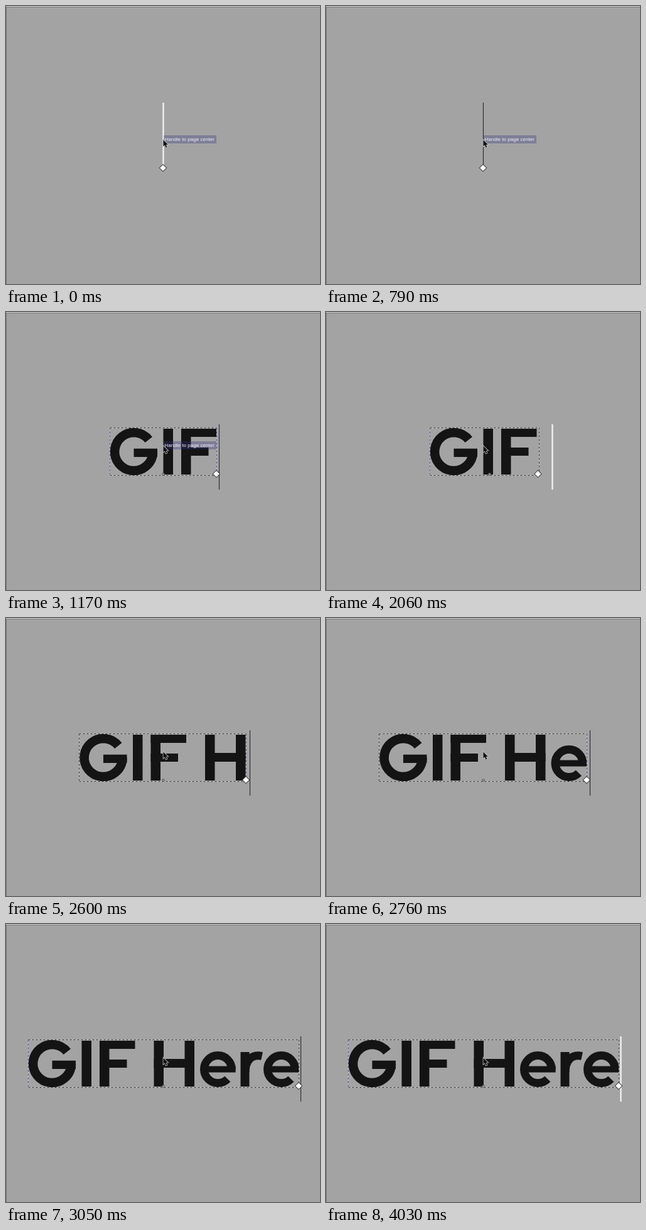
Write an HTML page with a canvas that moves like this. It is 500x443 px and loops after 4.07 s.

```html
<!DOCTYPE html>
<html lang="en">
<head>
<meta charset="utf-8">
<title>Typing on a canvas</title>
<style>
html, body { margin: 0; width: 100%; height: 100%; overflow: hidden; background: #a3a3a3; }
canvas { display: block; width: 500px; height: 443px; }
</style>
</head>
<body>
<canvas id="stage" width="500" height="443"></canvas>
<script>
const ctx = document.getElementById('stage').getContext('2d');
const LOOP = 4070;
const INK = '#141414';
const RAD = Math.PI / 180;

// Typed strings: time, text, left edge, box right, caret x, tinted box sides.
const TYPING = [
  { at: 0, text: '', caret: 250.5 },
  { at: 850, text: 'G', left: 212.5, right: 288, caret: 292.5, tint: 'LR' },
  { at: 950, text: 'GI', left: 199.5, right: 301, caret: 306, tint: 'LR' },
  { at: 1170, text: 'GIF', left: 165.5, right: 335.5, caret: 339.5, tint: 'LR' },
  { at: 1350, text: 'GIF ', left: 165.5, right: 339.5, caret: 360.5, tint: 'L', mid: 260.5 },
  { at: 2600, text: 'GIF H', left: 117, right: 382.5, caret: 388.5, tint: 'R' },
  { at: 2760, text: 'GIF He', left: 85, right: 415.5, caret: 420.5, tint: 'R' },
  { at: 2800, text: 'GIF Her', left: 66, right: 437.5, caret: 440, tint: 'R' },
  { at: 3050, text: 'GIF Here', left: 35.5, right: 466.5, caret: 469.5, tint: 'L' }
];
// Left offset of each character in the full phrase.
const OFFSETS = [0, 85, 113.5, 0, 200, 273.5, 338, 374.5];

const bar = (x, y, right, bottom) => ctx.fillRect(x, y, right - x, bottom - y);

function bowl(x, y, radius, weight, end, start) {
  ctx.lineWidth = weight;
  ctx.beginPath();
  ctx.arc(x, y, radius - weight / 2, start * RAD, end * RAD, true);
  ctx.stroke();
}

const GLYPHS = {
  G() {
    bowl(38, 222.5, 37.7, 14.6, 0, -38.5);
    bar(38, 217.7, 75.5, 231);
  },
  I() { bar(0, 186, 15.5, 259); },
  F() {
    bar(0, 186, 15.5, 259);
    bar(0, 186, 56.5, 199);
    bar(0, 216, 43.5, 229);
  },
  H() {
    bar(0, 186, 15.5, 259);
    bar(49, 186, 64.5, 259);
    bar(0, 215, 64.5, 229);
  },
  e() {
    bowl(28.4, 231.5, 28.4, 13, 45, 0);
    bar(8, 226.5, 56.6, 236.5);
  },
  r() {
    bar(0, 204, 14, 259);
    ctx.lineWidth = 13;
    ctx.beginPath();
    ctx.moveTo(7.5, 236);
    ctx.bezierCurveTo(7.5, 217, 18, 207, 34, 210.5);
    ctx.stroke();
  }
};

function polygon(points, fill, stroke, width) {
  ctx.beginPath();
  points.forEach(([x, y]) => ctx.lineTo(x, y));
  ctx.closePath();
  ctx.lineWidth = width;
  ctx.lineJoin = 'miter';
  ctx.strokeStyle = stroke;
  ctx.stroke();
  ctx.fillStyle = fill;
  ctx.fill();
}

function drawText({ text, left }) {
  ctx.fillStyle = ctx.strokeStyle = INK;
  [...text].forEach((char, i) => {
    if (char === ' ') return;
    ctx.save();
    ctx.translate(left + OFFSETS[i], 0);
    GLYPHS[char]();
    ctx.restore();
  });
}

function dashedLine(x1, y1, x2, y2, dark) {
  ctx.lineWidth = 1;
  for (const [color, dash] of [['#c6c6c6', []], [dark, [3, 3]]]) {
    ctx.strokeStyle = color;
    ctx.setLineDash(dash);
    ctx.beginPath();
    ctx.moveTo(x1, y1);
    ctx.lineTo(x2, y2);
    ctx.stroke();
  }
  ctx.setLineDash([]);
}

function drawBox({ left, right, tint, mid = 250.5 }) {
  const l = Math.floor(left - 0.5) + 0.5;
  const r = Math.floor(right) + 0.5;
  const dark = '#404040';
  const side = key => tint.includes(key) ? '#5a50b4' : dark;
  dashedLine(l, 184.5, r, 184.5, dark);
  dashedLine(l, 260.5, r, 260.5, dark);
  dashedLine(l, 184.5, l, 260.5, side('L'));
  dashedLine(r, 184.5, r, 260.5, side('R'));
  ctx.fillStyle = '#b8b8b8';
  ctx.fillRect(mid - 1.5, 257, 3, 3);
  ctx.strokeStyle = '#555';
  ctx.strokeRect(mid - 1.5, 257, 3, 3);
}

function drawCaret(x, top, white) {
  const width = white ? 2.4 : 1.2;
  ctx.fillStyle = white ? '#f0f0f0' : '#303030';
  ctx.fillRect(x - width / 2, top, width, 104);
}

function drawDiamond(x) {
  const y = 258, size = 5;
  polygon([[x, y - size], [x + size, y], [x, y + size], [x - size, y]], '#fff', '#303030', 1.8);
}

function drawTooltip() {
  ctx.fillStyle = 'rgba(51,51,127,0.33)';
  ctx.fillRect(251, 206, 84, 13);
  ctx.fillStyle = '#f2f2f6';
  ctx.font = '8.1px "Liberation Sans", Arial, sans-serif';
  ctx.fillText('Handle to page center', 252.3, 215);
}

function drawPointer() {
  polygon([[250.5, 213.5], [250.5, 223.5], [252.8, 221.5], [254.5, 225.5],
    [256.4, 224.7], [254.7, 221], [257.8, 220.7]], '#111', '#c4c4c4', 1.6);
}

function drawBackground() {
  ctx.fillStyle = '#a3a3a3';
  ctx.fillRect(0, 0, 500, 443);
  ctx.fillStyle = '#dedede';
  ctx.fillRect(0, 0, 500, 1);
  ctx.fillStyle = '#747474';
  ctx.fillRect(0, 1, 500, 1);
  ctx.fillRect(0, 1, 1, 442);
}

function render(time) {
  const state = TYPING.findLast(step => step.at <= time);
  const whiteCaret = time < 790 || (time >= 2060 && time < 2600) || time >= 3770;
  drawBackground();
  if (state.text) {
    drawText(state);
    drawBox(state);
  }
  drawCaret(state.caret, state.text ? 179 : 154, whiteCaret);
  drawDiamond(state.text ? state.right - (state.mid ? 2 : 0.5) : 250);
  if (time < 1690) drawTooltip();
  drawPointer();
}

const start = performance.now();
function tick() {
  render((performance.now() - start) % LOOP);
  requestAnimationFrame(tick);
}
tick();
</script>
</body>
</html>
```
